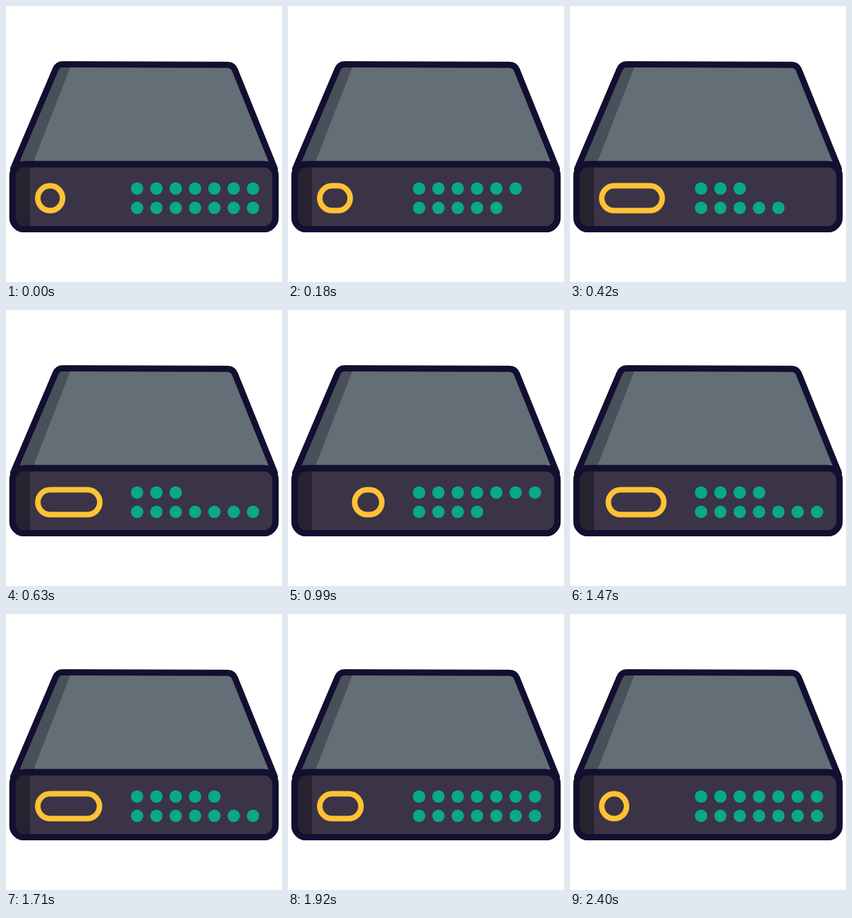
Write an HTML page that moves like this. It is 400x400 px and loops after 2.46 s.

```html
<!DOCTYPE html>
<html lang="en">
<head>
<meta charset="utf-8">
<title>Server lights</title>
<style>
  html, body { margin: 0; width: 100%; height: 100%; overflow: hidden; background: #fff; }
  svg { display: block; width: 100vw; height: 100vh; }
</style>
</head>
<body>
<svg viewBox="0 0 400 400">
  <defs>
    <path id="lid" d="M10.400 236L71.800 91.500Q75 84.400 82 84.400L320 85.300Q328.500 85.300 331.500 92L389.600 236Z"/>
    <rect id="front" x="9.400" y="229.300" width="381.200" height="94.300" rx="17"/>
    <clipPath id="lidClip"><use href="#lid"/></clipPath>
    <clipPath id="frontClip"><use href="#front"/></clipPath>
  </defs>
  <g stroke="#120f30" stroke-width="9" stroke-linejoin="round">
    <use href="#lid" fill="#646e77" stroke="none"/>
    <path d="M0 80H96.500L39 228H0Z" fill="#485059" stroke="none" clip-path="url(#lidClip)"/>
    <use href="#lid" fill="none"/>
    <use href="#front" fill="#3b3446"/>
    <path d="M0 225H35.500Q33.500 276 35.500 328H0Z" fill="#27222f" stroke="none" clip-path="url(#frontClip)"/>
    <use href="#front" fill="none"/>
  </g>
  <rect id="pill" y="260.600" height="36" rx="18" fill="none" stroke="#ffc235" stroke-width="8"/>
  <g id="dots" fill="#0aa88a"></g>
</svg>
<script>
const LOOP = 2460, DOTS = 7;
const pill = document.getElementById('pill');
const dots = document.getElementById('dots');

// Keys are [time in ms, value].
const leftKeys = [[0, 42], [590, 42], [1125, 96], [1660, 42]];
const rightKeys = [[0, 86], [540, 140], [1640, 140], [2180, 86]];
const rows = [
  { y: 264.6, keys: [[0, 7], [525, 3], [1050, 7], [1530, 4], [2050, 7]] },
  { y: 292.6, keys: [[0, 7], [315, 4], [600, 7], [960, 4], [1350, 7]] }
];

for (const row of rows) {
  row.dots = Array.from({ length: DOTS }, (_, i) => {
    const dot = document.createElementNS('http://www.w3.org/2000/svg', 'circle');
    dot.setAttribute('cx', 190 + 28 * i);
    dot.setAttribute('cy', row.y);
    dot.setAttribute('r', 9);
    return dots.appendChild(dot);
  });
}

const ease = u => u < 0.5 ? 4 * u ** 3 : 1 - 4 * (1 - u) ** 3;

function valueAt(keys, t) {
  const next = keys.findIndex(([time]) => time > t);
  if (next < 0) return keys[keys.length - 1][1];
  const [t0, a] = keys[next - 1], [t1, b] = keys[next];
  return a + (b - a) * ease((t - t0) / (t1 - t0));
}

function draw() {
  const t = performance.now() % LOOP;
  const left = valueAt(leftKeys, t), right = valueAt(rightKeys, t);
  pill.setAttribute('x', left + 4);
  pill.setAttribute('width', right - left - 8);
  for (const row of rows) {
    const lit = Math.round(valueAt(row.keys, t));
    row.dots.forEach((dot, i) => dot.setAttribute('visibility', i < lit ? 'visible' : 'hidden'));
  }
  requestAnimationFrame(draw);
}
draw();
</script>
</body>
</html>
```
